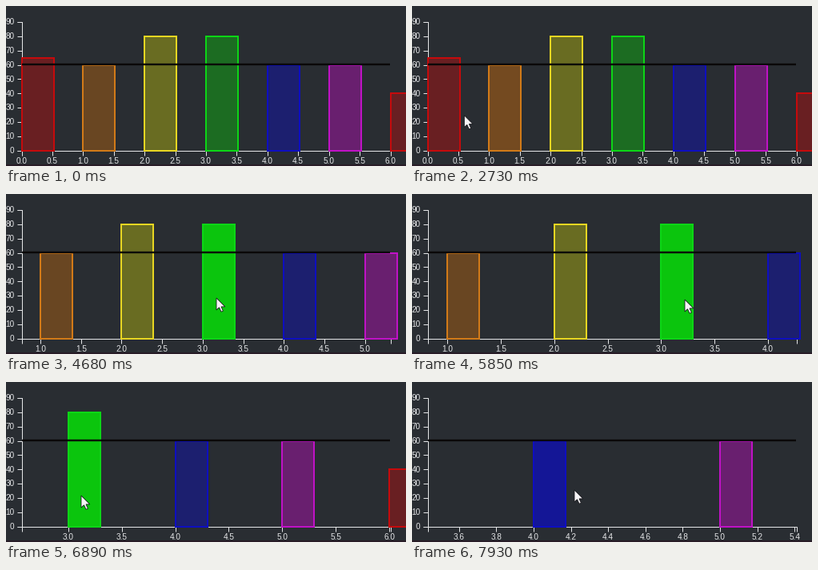
Write a matplotlib script that moves like this. It is 500x200 px and loops after 8000 ms.

```python
import math

import matplotlib.pyplot as plt
import numpy as np
from matplotlib.animation import FuncAnimation
from matplotlib.collections import LineCollection
from matplotlib.patches import Polygon, Rectangle

W, H, DPI = 500, 200, 100
PX = 72 / DPI                      # one pixel in points
LOOP, INTERVAL, STEP, FINE = 8000, 20, 130, 10

LEFT, RIGHT, TOP, BASE = 19.5, 480.5, 20.0, 180.5
UNIT = (RIGHT - LEFT) / 6          # pixels per x unit before zooming
BAR_W, DIM, LIT, FADE = 40, 0.30, 0.73, 250
BG, INK = "#292d32", "#e4e5e7"

RED = ((1, 0, 0), "#c60a0c")
BARS = [  # value, (fill, stroke)
    (65, RED),
    (60, ((1, 0.5, 0), "#d27a18")),
    (80, ((1, 1, 0), "#e8d622")),
    (80, ((0, 1, 0), "#0cd616")),
    (60, ((0, 0, 1), "#0e0ec0")),
    (60, ((1, 0, 1), "#c012c6")),
    (40, RED),
]

# Pointer path: time, x, y
PATH = np.array([
    (1300, 420, 230), (1430, 372, 172), (1485, 290, 146), (1690, 269, 138),
    (2080, 190, 136), (2470, 112, 134), (2860, 42, 138), (3250, 118, 134),
    (3570, 213, 130), (3697, 250, 131), (3770, 257, 132), (4290, 263, 130),
    (5590, 263, 130), (5720, 285, 131), (5850, 341, 132), (6110, 385, 134),
    (6500, 250, 138), (6890, 94, 142), (7020, 62.6, 142), (7410, 203, 135),
])
WHEEL_A, ANCHOR_A = (4550, 4680, 5070, 5200), 263
WHEEL_B, ANCHOR_B = (7540, 7670, 7800, 7930), 203
DRAG_END, DRAG_LAG = 7020, 16
ARROW = np.array([(0, 0), (0, 15), (3.5, 11.8), (6, 17.2), (8.4, 16.2),
                  (6, 10.9), (10.8, 10.9)])


def y_of(value):
    return BASE - value * (BASE - TOP) / 90


def pointer(t):
    return np.array([np.interp(t, PATH[:, 0], PATH[:, i]) for i in (1, 2)])


def zoom(x0, k, anchor, clicks):
    f = 2 ** (0.2 * clicks)
    return anchor + (x0 - anchor) * f, k * f


def view(t):
    """Pixel position of x = 0 and pixels per unit."""
    x0, k = zoom(LEFT, UNIT, ANCHOR_A, sum(t >= c for c in WHEEL_A))
    if t > WHEEL_A[-1]:
        x0 += pointer(min(t - DRAG_LAG, DRAG_END))[0] - ANCHOR_A
    return zoom(x0, k, ANCHOR_B, sum(t >= c for c in WHEEL_B))


def hover_levels():
    """Fill opacity of each bar over the whole loop."""
    level = np.full(len(BARS), DIM)
    rows = []
    for t in range(0, LOOP, FINE):
        x0, k = view(t)
        px, py = pointer(t)
        for i, (value, _) in enumerate(BARS):
            over = 0 <= px - x0 - i * k <= BAR_W and y_of(value) <= py <= BASE
            level[i] += (1 if over else -1) * (LIT - DIM) * FINE / FADE
        level = np.clip(level, DIM, LIT)
        rows.append(level.copy())
    return rows


def tick_step(span, count=10):
    raw = span / count
    step = 10 ** math.floor(math.log10(raw))
    err = raw / step
    for limit, factor in ((50, 10), (10, 5), (2, 2)):
        if err >= math.sqrt(limit):
            return step * factor
    return step


fig = plt.figure(figsize=(W / DPI, H / DPI), dpi=DPI, facecolor=BG)
ax = fig.add_axes((0, 0, 1, 1))
ax.set(xlim=(0, W), ylim=(H, 0))
ax.axis("off")


def stroke(xs, ys, color=INK, width=1.0, z=1):
    ax.plot(xs, ys, color=color, lw=width * PX, zorder=z,
            solid_capstyle="butt", solid_joinstyle="miter")


def label(x, y, text, align):
    return ax.text(x, y, text, color=INK, fontsize=10 * PX, ha=align,
                   va="baseline", family="Liberation Sans", zorder=1)


ax.add_patch(Rectangle((0, 198), W, 2, fc="#281c27", lw=0))
stroke([LEFT - 6, LEFT, LEFT, LEFT - 6], [TOP, TOP, BASE, BASE])
stroke([LEFT, LEFT, RIGHT, RIGHT], [BASE + 6, BASE, BASE, BASE + 6])
for v in range(0, 91, 10):
    stroke([LEFT - 6, LEFT], [y_of(v)] * 2)
    label(LEFT - 9, y_of(v) + 3.4, str(v), "right")

ticks = LineCollection([], colors=INK, linewidths=PX, zorder=1)
ax.add_collection(ticks)
names = [label(0, BASE + 16.3, "", "center") for _ in range(18)]

rects = []
for value, (_, edge) in BARS:
    rect = Rectangle((0, y_of(value)), BAR_W, BASE - y_of(value), ec=edge,
                     lw=2 * PX, joinstyle="miter", zorder=2)
    rects.append(ax.add_patch(rect))

stroke([LEFT, RIGHT - 0.5], [73.2, 73.2], "#0a0808", 2.4, 3)
arrow = ax.add_patch(Polygon(ARROW, fc="#f6f4f6", ec="#15151a",
                             lw=0.8 * PX, zorder=4))
LEVELS = hover_levels()


def draw(i):
    t = (i * INTERVAL + INTERVAL // 2) // STEP * STEP
    x0, k = view(t)

    for n, (rect, (_, (fill, _))) in enumerate(zip(rects, BARS)):
        rect.set_x(x0 + n * k)
        rect.set_facecolor((*fill, LEVELS[t // FINE][n]))

    lo, hi = (LEFT - x0) / k, (RIGHT - x0) / k
    step = tick_step(hi - lo)
    first, last = math.ceil(lo / step - 1e-6), math.floor(hi / step + 1e-6)
    values = [n * step for n in range(first, last + 1)]
    ticks.set_segments([[(x0 + v * k, BASE), (x0 + v * k, BASE + 6)]
                        for v in values])
    for n, name in enumerate(names):
        name.set_visible(n < len(values))
        if n < len(values):
            name.set_x(x0 + values[n] * k)
            name.set_text(f"{values[n]:.1f}")

    arrow.set_xy(ARROW + pointer(t))
    return [*rects, *names, ticks, arrow]


anim = FuncAnimation(fig, draw, frames=LOOP // INTERVAL, interval=INTERVAL,
                     repeat=True, repeat_delay=0, blit=False)
plt.show()
```
